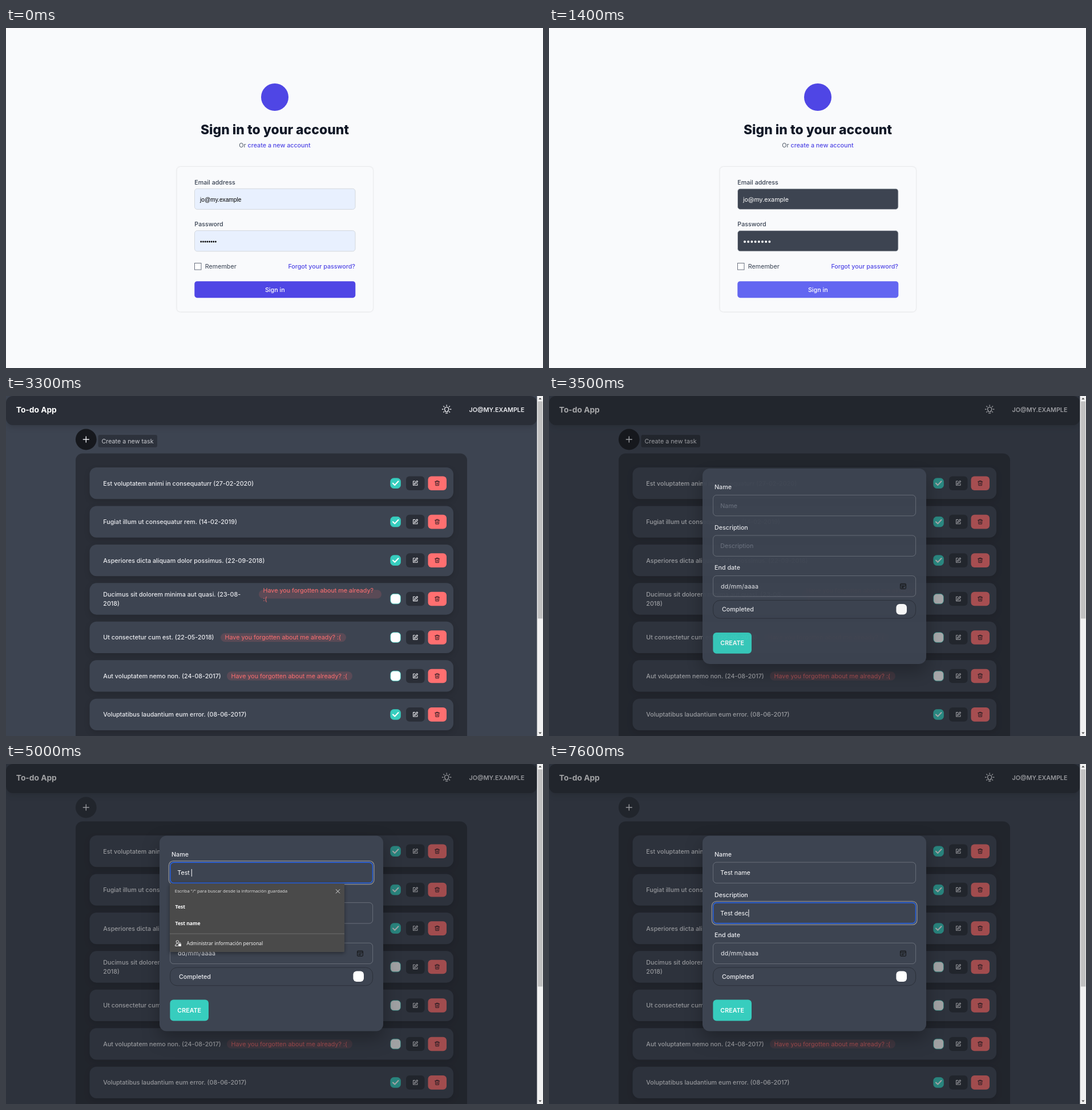
An HTML page that plays this animation: 941x595 px, repeating every 8000 ms.

```html
<!DOCTYPE html>
<html lang="en">
<head>
<meta charset="utf-8">
<title>To-do App</title>
<style>
html, body { margin: 0; width: 100%; height: 100%; overflow: hidden; background: #f9fafc; }
svg { display: block; width: 941px; height: 595px; }
text { font-family: Inter, sans-serif; white-space: pre; }
.arial { font-family: "Liberation Sans", Arial, sans-serif; }
.sys text { font-family: "Open Sans", "Noto Sans", sans-serif; }
.card { filter: drop-shadow(0 .8px 1px rgba(0,0,0,.18)); }
.lift { filter: drop-shadow(0 4px 5px rgba(0,0,0,.13)); }
.high { filter: drop-shadow(0 13px 15px rgba(0,0,0,.28)); }
.menu { filter: drop-shadow(0 2px 3px rgba(0,0,0,.4)); }
</style>
</head>
<body>
<svg id="stage" viewBox="0 0 941 595" xmlns="http://www.w3.org/2000/svg"></svg>
<script>
const BASE = '#3d4451', DARK = '#2a2e37', DEEP = '#16181d', TEAL = '#37cdbe',
      RED = '#ff6f70', INDIGO = '#4f46e5', INDIGO_LIT = '#6366f1', PALE = '#ebecf0';
const SMALL = 10.72, FIELD_X = 300.3;
const EMAIL = 'jo@my.example';

// --- drawing helpers ---
const rect = (x, y, w, h, fill, rx = 0, more = '') =>
  `<rect x="${x}" y="${y}" width="${w}" height="${h}" rx="${rx}" fill="${fill}" ${more}/>`;
const text = (x, mid, str, fill, weight = 400, size = SMALL, more = '') =>
  `<text x="${x}" y="${mid + size * .364}" font-size="${size}" font-weight="${weight}" fill="${fill}" ${more}>${str}</text>`;
const path = (d, stroke, width, more = '') =>
  `<path d="${d}" fill="none" stroke="${stroke}" stroke-width="${width}" stroke-linecap="round" stroke-linejoin="round" ${more}/>`;
const icon = (x, y, scale, d, stroke, width) =>
  path(d, stroke, width, `transform="translate(${x} ${y}) scale(${scale})"`);
const group = (id, body, more = '') => `<g id="${id}" ${more}>${body}</g>`;
const dots = (x, pitch, r) => Array.from({ length: 8 }, (_, i) =>
  `<circle cx="${x + i * pitch}" cy="374" r="${r}"/>`).join('');
const mid = 'text-anchor="middle"', end = 'text-anchor="end"';

// --- sign-in page ---
function signIn() {
  const field = (y, cls) => rect(330.5, y, 281.5, 36.2, '#e8f0fe', 4.6, `class="${cls}" stroke="#d1d5db" stroke-width=".9"`);
  return rect(0, 0, 941, 595, '#f9fafc') +
    `<circle cx="471" cy="121" r="24" fill="${INDIGO}"/>` +
    text(471, 178, 'Sign in to your account', '#111827', 800, 22.97, mid) +
    text(471, 205.5, `Or <tspan font-weight="500" fill="${INDIGO}">create a new account</tspan>`, '#4b5563', 400, SMALL, mid) +
    rect(299.5, 243, 343.5, 253.5, '#f9fafc', 6, 'class="card"') +
    text(330.3, 270, 'Email address', '#374151', 500) + field(281.2, 'field') +
    text(330.3, 343.5, 'Password', '#374151', 500) + field(354.6, 'field') +
    group('filled', text(340, 300, EMAIL, '#000', 400, 10.2, 'class="arial"') + dots(341.8, 3.65, 1.4)) +
    group('entered', text(340, 300, EMAIL, '#fff') + dots(343, 6.2, 2), 'fill="#fff"') +
    rect(330.5, 411.5, 11.5, 11.5, '#fff', 0, 'stroke="#6b7280"') +
    text(348.8, 417.3, 'Remember', '#374151') +
    text(612, 417.3, 'Forgot your password?', INDIGO, 500, SMALL, end + ' id="forgot"') +
    rect(330.3, 443.2, 282, 29, INDIGO, 4.6, 'id="submit"') +
    text(471.3, 457.8, 'Sign in', '#fff', 500, SMALL, mid);
}

// --- task list ---
const LATE = 'Have you forgotten about me already?';
const tasks = [
  { name: ['Est voluptatem animi in consequaturr (27-02-2020)'], done: 1 },
  { name: ['Fugiat illum ut consequatur rem. (14-02-2019)'], done: 1 },
  { name: ['Asperiores dicta aliquam dolor possimus. (22-09-2018)'], done: 1 },
  { name: ['Ducimus sit dolorem minima aut quasi. (23-08-', '2018)'], late: 443 },
  { name: ['Ut consectetur cum est. (22-05-2018)'], late: 376 },
  { name: ['Aut voluptatem nemo non. (24-08-2017)'], late: 387 },
  { name: ['Voluptatibus laudantium eum error. (08-06-2017)'], done: 1 }
];

function badge(x, y, wraps) {
  const top = wraps ? y - 15.8 : y - 7.6;
  const pill = rect(x, top, wraps ? 215 : 220, 15.3, RED, 7.65, 'fill-opacity=".15"');
  return pill + (wraps
    ? text(x + 7.5, y - 15, LATE, RED) + text(x + 7.5, y + .3, ':(', RED)
    : text(x + 7.5, y, LATE + ' :(', RED));
}

function taskRow({ name, done, late }, i) {
  const top = 125 + 67.45 * i, y = top + 27.7;
  const lines = name.map((line, n) =>
    text(170.3, y + (n - (name.length - 1) / 2) * 15.3, line, PALE, 500)).join('');
  return rect(146.5, top, 637.5, 55.3, BASE, 12.2, 'class="lift"') + lines +
    (late ? badge(late, y, name.length > 1) : '') +
    rect(673.8, y - 8.8, 17.6, 17.6, done ? TEAL : '#fff', 5.6, `stroke="${TEAL}" stroke-width=".8"`) +
    (done ? path(`M678 ${y}l3.3 3.2 6.2-6.6`, '#fff', 2.1) : '') +
    rect(701, y - 12.3, 32.5, 24.6, DARK, 6) +
    icon(711.7, y - 5.6, .46, 'M11 4H4v16h16v-7M18.5 2.5l3 3L12 15l-4 1 1-4z', PALE, 2.3) +
    rect(739.5, y - 12.3, 32.5, 24.6, RED, 6) +
    icon(750.2, y - 5.5, .45, 'M3 6h18M19 6l-1 15H6L5 6M8 6V3h8v3M10 11v6M14 11v6', '#3a2228', 2.2);
}

function taskPage() {
  return rect(0, 0, 941, 595, BASE) +
    rect(0, 0, 930.5, 51, DARK, 12.2, 'class="lift"') +
    text(17.8, 23.8, 'To-do App', '#fff', 700, 13.78) +
    icon(763.4, 14.8, .73, 'M9.3 17.5v-2a5 5 0 1 1 5.4 0v2zM10 21h4M12 1.5v2M1.5 11.5h2M20.5 11.5h2M4.6 4.2l1.4 1.4M19.4 4.2l-1.4 1.4M4.6 18.6l1.4-1.4M19.4 18.6l-1.4-1.4', PALE, 1.9) +
    text(908.4, 24, EMAIL.toUpperCase(), PALE, 600, SMALL, end) +
    `<circle id="add" cx="140.3" cy="76" r="18.4" fill="${DARK}"/>` +
    path('M135.3 76h10M140.3 71v10', PALE, 1.4) +
    group('tip', rect(161.5, 68, 103.5, 21.8, DARK, 3) + text(167.5, 79, 'Create a new task', PALE)) +
    rect(122, 100.5, 686, 520, DARK, 12.2) +
    tasks.map(taskRow).join('');
}

// --- new-task dialog ---
const fieldTop = [172, 242.6, 313.2];
const input = top => rect(287.6, top, 355, 36.4, 'none', 6, `stroke="${PALE}" stroke-opacity=".28" stroke-width=".9"`);
const ring = (id, top) => group(id,
  rect(285.3, top - 2.3, 359.7, 41, 'none', 8, `stroke="${PALE}" stroke-opacity=".45" stroke-width="1.3"`) +
  rect(287.8, top + .2, 354.7, 36, 'none', 6, 'stroke="#2563eb" stroke-width="1.4"'));

function editable(id, hint, top) {
  const y = top + 18.4;
  return input(top) + ring(id + 'Ring', top) +
    text(FIELD_X, y, hint, '#6f7683', 400, SMALL, `id="${id}Hint"`) +
    text(FIELD_X, y, '', '#fff', 400, SMALL, `id="${id}Text"`) +
    rect(FIELD_X, y - 6.5, 1, 13, '#fff', 0, `id="${id}Caret"`);
}

function dialog() {
  const label = (i, str) => text(290, fieldTop[i] - 14, str, PALE, 500);
  return rect(269, 125.5, 392, 342, BASE, 12.2, 'class="high"') +
    label(0, 'Name') + editable('name', 'Name', fieldTop[0]) +
    label(1, 'Description') + editable('desc', 'Description', fieldTop[1]) +
    label(2, 'End date') + input(fieldTop[2]) +
    text(301, 331.3, 'dd/mm/aaaa', PALE, 400, SMALL, 'letter-spacing=".25"') +
    rect(615.7, 327, 9.6, 9.2, 'none', 1, 'stroke="#111"') +
    path('M616 329.3h9M618 332h5M618 334h3', '#111', 1.1) +
    rect(287.6, 356.2, 355, 31.6, 'none', 12, `stroke="${DARK}" stroke-width=".9"`) +
    text(303, 372, 'Completed', PALE, 500) +
    rect(608.4, 362.5, 18.6, 18.6, '#fff', 6) +
    rect(287.4, 412.6, 67.6, 36.8, TEAL, 6) +
    text(321.2, 431, 'CREATE', '#fff', 600, SMALL, mid);
}

function suggestions(id, items, height) {
  const foot = 209 + height;
  return group(id,
    rect(287, 209, 306, height, '#4a4a4a', 1.5, 'class="menu"') +
    text(295.8, 222.6, 'Escriba "/" para buscar desde la información guardada', '#e4e4e4', 400, 7.8) +
    path('M578.3 219.6l6.4 6.4M584.7 219.6l-6.4 6.4', '#eee', .9) +
    items.map((item, i) => text(296.5, 250 + 29 * i, item, '#fff', 700, 8.6)).join('') +
    rect(287, foot - 32.4, 306, .9, '#727272') +
    `<circle cx="300.3" cy="${foot - 18}" r="2.2" fill="none" stroke="#eee"/>` +
    path(`M301 ${foot - 10.6}h-4.5q0-4 4-4`, '#eee', 1) +
    rect(302, foot - 14.6, 5, 4.6, '#eee', .6) +
    path(`M303.2 ${foot - 15}v-1q1.3-1.6 2.6 0v1`, '#eee', .8) +
    text(316.5, foot - 15.2, 'Administrar información personal', '#fff', 400, 8.5), 'class="sys"');
}

function scrollbar() {
  return rect(930.5, 0, 10.5, 595, '#f1f1f1') + rect(932, 9.5, 8.2, 380, '#c1c1c1') +
    '<path d="M933.2 6h5.4l-2.7-3zM933.2 588.5h5.4l-2.7 3z" fill="#505050"/>';
}

document.getElementById('stage').innerHTML =
  group('login', signIn()) +
  group('app', taskPage() +
    rect(0, 0, 930.5, 595, DEEP, 0, 'id="shade"') +
    group('modal', dialog()) +
    suggestions('menuAll', ['Test', 'Test name', 'Comprar pan', 'Nueva tarea', 'Lista', 'Ejemplo', 'Repaso'], 275) +
    suggestions('menuTwo', ['Test', 'Test name'], 120) +
    suggestions('menuOne', ['Test name'], 91) +
    scrollbar());

// --- timeline: each track is a list of [start ms, value] ---
const tracks = {
  page: [[0, 'login'], [1800, 'app']],
  forgot: [[0, INDIGO], [900, INDIGO_LIT], [1000, INDIGO]],
  submit: [[0, INDIGO], [900, '#5956eb'], [1000, INDIGO_LIT]],
  fill: [[0, 0], [1200, .35], [1300, .8], [1400, 1]],
  add: [[0, DARK], [3300, DEEP], [3600, '#20232a'], [3700, DARK]],
  tip: [[0, 0], [3300, .8], [3400, 1], [3600, .7], [3700, .3], [3800, 0]],
  open: [[0, 0], [3400, .25], [3500, .955], [3600, 1]],
  nameRing: [[0, 0], [4100, .5], [4200, 1], [5700, .4], [5800, 0]],
  descRing: [[0, 0], [5700, .6], [5800, 1]],
  nameCaret: [[0, 0], [4100, 1], [5700, 0]],
  descCaret: [[0, 0], [5700, 1], [6200, 0], [6400, 1]],
  menu: [[0, ''], [4200, 'menuAll'], [4400, 'menuTwo'], [5200, 'menuOne'], [5300, '']],
  name: [[0, 0], [4400, 1], [4600, 2], [4800, 3], [4900, 4], [5000, 5], [5200, 7], [5300, 8], [5500, 9]],
  desc: [[0, 0], [6400, 1], [6600, 2], [6800, 3], [6900, 4], [7000, 5], [7200, 6], [7400, 7], [7500, 8], [7600, 9]]
};
const typed = { name: 'Test name', desc: 'Test desc' };
const LOOP = 8000;

const $ = id => document.getElementById(id);
const show = (id, on) => { $(id).style.display = on ? '' : 'none'; };
const at = (track, t) => tracks[track].reduce((v, [start, next]) => t >= start ? next : v, null);
const blend = (a, b, k) => `rgb(${a.map((v, i) => Math.round(v + (b[i] - v) * k))})`;

function drawField(id, t) {
  const value = typed[id].slice(0, at(id, t)), label = $(id + 'Text');
  if (label.textContent !== value) label.textContent = value;
  show(id + 'Hint', !value);
  show(id + 'Caret', at(id + 'Caret', t));
  $(id + 'Caret').setAttribute('x', FIELD_X + (value ? label.getComputedTextLength() : 0));
  $(id + 'Ring').setAttribute('opacity', at(id + 'Ring', t));
}

function draw(t) {
  const page = at('page', t), fill = at('fill', t), open = at('open', t), menu = at('menu', t);
  show('login', page === 'login');
  show('app', page === 'app');
  for (const id of ['forgot', 'submit', 'add']) $(id).setAttribute('fill', at(id, t));
  for (const el of document.querySelectorAll('.field'))
    el.setAttribute('fill', blend([232, 240, 254], [61, 68, 81], fill));
  show('filled', fill === 0);
  show('entered', fill > 0);
  $('tip').setAttribute('opacity', at('tip', t));
  $('shade').setAttribute('opacity', .4 * open);
  show('modal', open);
  $('modal').setAttribute('opacity', open);
  $('modal').setAttribute('transform', `translate(0 ${30.6 * (1 - open)})`);
  for (const id of ['menuAll', 'menuTwo', 'menuOne']) show(id, id === menu);
  if (page === 'app') ['name', 'desc'].forEach(id => drawField(id, t));
}

const began = performance.now();
function tick() {
  draw((performance.now() - began) % LOOP);
  requestAnimationFrame(tick);
}
tick();
</script>
</body>
</html>
```
